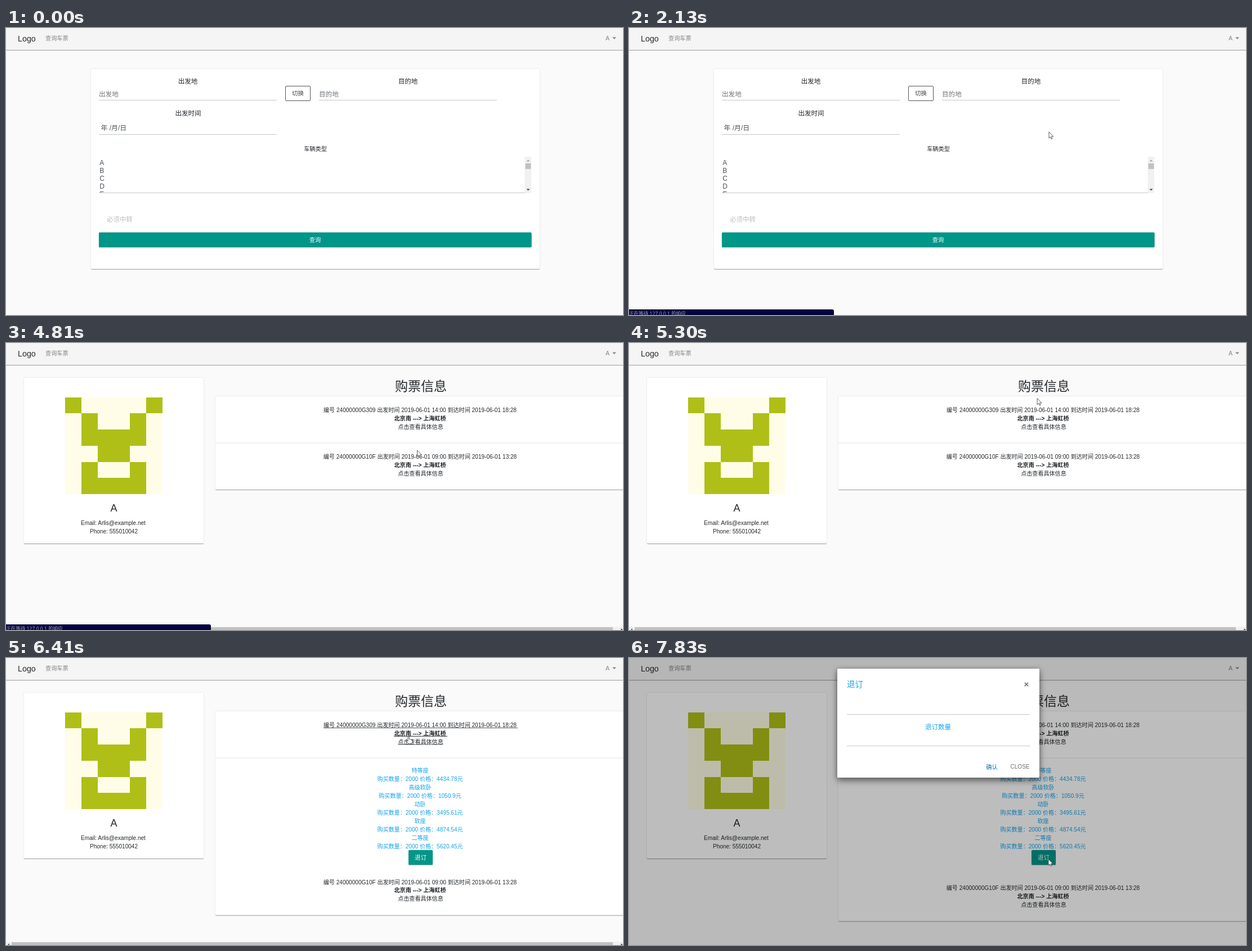
These frames come from a looping animation (1096x511 px, 8 s). An HTML page:

```html
<!DOCTYPE html>
<html lang="zh-CN">
<head>
<meta charset="utf-8">
<title>查询车票</title>
<style>
html, body { margin: 0; width: 100%; height: 100%; overflow: hidden; background: #fafafa; }
svg { display: block; width: 1096px; height: 511px; }
text { font-family: "Liberation Sans", "Noto Sans CJK SC", "Noto Sans CJK", sans-serif; white-space: pre; }
.status text { font-family: "Open Sans", "Noto Sans CJK SC", "Noto Sans CJK", sans-serif; }
.raised { filter: drop-shadow(0 1.3px .7px rgba(0,0,0,.32)) drop-shadow(0 0 1px rgba(0,0,0,.14)); }
.floating { filter: drop-shadow(0 5px 6px rgba(0,0,0,.4)) drop-shadow(0 1px 4px rgba(0,0,0,.25)); }
</style>
</head>
<body>
<svg id="stage" viewBox="0 0 1096 511"></svg>
<script>
const LOOP = 8000;
const INK = '#24282c', MUTED = '#858585', LINE = '#c6c6c6', TEAL = '#009688', BLUE = '#14a3ea';
const BODY = 10.07, FIELD = 11.5;
const USER = 'A';

// Markup helpers; text is placed by its visual centre line.
const text = (x, cy, size, str, fill = INK, attrs = '') =>
  `<text x="${x}" y="${(cy + size * 0.37).toFixed(2)}" font-size="${size}" fill="${fill}" ${attrs}>${str}</text>`;
const mid = (x, cy, size, str, fill = INK, attrs = '') =>
  text(x, cy, size, str, fill, 'text-anchor="middle" ' + attrs);
const rect = (x, y, w, h, fill, attrs = '') =>
  `<rect x="${x}" y="${y}" width="${w}" height="${h}" fill="${fill}" ${attrs}/>`;
const rule = (x, y, w, fill = LINE) => rect(x, y, w, 1, fill);
const path = (d, fill, attrs = '') => `<path d="${d}" fill="${fill}" ${attrs}/>`;
const group = (id, body, attrs = '') => `<g id="${id}" ${attrs}>${body}</g>`;
const RAISED = 'rx="1.5" class="raised"';

function navbar() {
  return rect(-5, -5, 1106, 44, '#f5f5f5', 'class="raised"') +
    text(21, 18.5, 14.3, 'Logo', '#2b2b2b') +
    text(70, 18.5, 10.2, '查询车票', MUTED) +
    group('user', text(1065, 18.5, 10.6, USER, 'inherit') +
      path('M1077 16.5h7l-3.5 3.6z', 'inherit'));
}

function searchForm() {
  const rows = [...'ABCDE'].map((c, i) => text(166.3, 240 + 14 * i, 12, c, '#495057')).join('');
  return rect(151, 73, 797, 356, '#fff', RAISED) +
    mid(323, 95, FIELD, '出发地') + text(165, 117.5, 11.6, '出发地', '#70757a') + rule(165, 128, 316) +
    rect(496.5, 103.5, 44, 26, '#fff', 'rx="1.5" stroke="#555"') + mid(518.5, 116.5, 10.4, '切换', '#444') +
    mid(714, 95, FIELD, '目的地') + text(556, 117.5, 11.6, '目的地', '#70757a') + rule(556, 128, 316) +
    mid(323.5, 152, FIELD, '出发时间') + text(168.5, 177.5, 11.9, '年 /月/日', '#495057') + rule(165, 189, 316) +
    mid(549.5, 215.5, 10.2, '车辆类型') +
    `<g clip-path="url(#listClip)">${rows}</g>` + rule(165, 293, 768) +
    rect(921.5, 229, 11.5, 65, '#f1f1f1') + rect(922.5, 241, 10, 10, '#c1c1c1') +
    path('M924.5 237.5h6l-3-3z', '#a3a3a3') + path('M924.5 286.5h6l-3 3z', '#444') +
    text(179, 341, FIELD, '必须中转', '#bdbdbd') +
    rect(165, 364, 768.5, 26, TEAL, RAISED) + mid(549, 377, 10.3, '查询', '#fff', 'font-weight="500"');
}

function userMenu() {
  return rect(980, 34, 109, 109, '#fff', RAISED) +
    group('menuHover', rect(980, 39.5, 109, 32.5, '#f8f9fa')) +
    ['Profile', 'Settings', 'Logout'].map((s, i) => text(996.3, 56 + 32.6 * i, 11, s, '#3c3c3c')).join('');
}

function avatar() {
  const cell = 28.75;
  const rows = ['100001', '010010', '011110', '001100', '010010', '011110'];
  let d = '';
  rows.forEach((row, r) => [...row].forEach((on, c) => {
    if (+on) d += `M${105 + c * cell} ${96.5 + r * cell}h${cell}v${cell}h${-cell}z`;
  }));
  return rect(105, 96.5, 172.5, 172.5, '#fffde7') + path(d, '#afbf17', 'shape-rendering="crispEdges"');
}

function order(cy, id, start, end) {
  const date = '2019-06-01';
  return mid(735.5, cy, BODY, `编号 ${id} 出发时间 ${date} ${start} 到达时间 ${date} ${end}`) +
    mid(735.5, cy + 14.8, BODY, '北京南 ---&gt; 上海虹桥', '#1b1e21', 'font-weight="bold"') +
    mid(736.5, cy + 29.8, BODY, '点击查看具体信息');
}

function details() {
  const seats = [['特等座', '4434.78'], ['高级软卧', '1050.9'], ['动卧', '3495.61'], ['软座', '4874.54'], ['二等座', '5620.45']];
  return seats.map(([name, price], i) =>
    mid(735.5, 200 + 30 * i, BODY, name, BLUE) +
    mid(735.5, 215 + 30 * i, BODY, `购买数量：2000 价格：${price}元`, BLUE)).join('') +
    rect(715, 342, 43, 26, TEAL, RAISED) + mid(736.5, 355, 10.4, '退订', '#fff', 'font-weight="500"');
}

function profile() {
  return rect(32, 62, 319, 295, '#fff', RAISED) + avatar() +
    mid(191.5, 293.5, 18, USER) +
    mid(190.5, 320.5, BODY, 'Email: Arlis@example.net') +
    mid(191.5, 335.5, BODY, 'Phone: 555010042') +
    mid(737, 76, 23, '购票信息') +
    rect(372, 95, 760, 166, '#fff', 'id="panel" ' + RAISED) + rule(372, 177.5, 724, '#e4e4e4') +
    group('press', rect(552.5, 107, 368.5, 55, '#f5f5f5', 'rx="1.5"')) +
    order(119.3, '24000000G309', '14:00', '18:28') +
    group('underline', rect(564, 124, 345, 0.8, INK) + rect(689, 138.8, 95, 1, INK) + rect(696.5, 153.6, 80, 0.8, INK)) +
    group('details', details(), 'clip-path="url(#detailClip)"') +
    group('second', order(202.2, '24000000G10F', '09:00', '13:28')) +
    group('scrollbar', rect(0, 505, 1096, 6, '#f1f1f1') + rect(10, 506, 1068, 5, '#c1c1c1') +
      path('M6 508v3h-1l-2-.5z', '#505050') + path('M1092.5 508l3 3h-3z', '#303030'));
}

function modal() {
  return rect(370, 19, 359, 194, '#fff', 'rx="1.5" class="floating"') +
    text(387, 47, 14.4, '退订', BLUE) + mid(706, 46, 15, '×', '#6f6f6f', 'font-weight="bold"') +
    rule(387, 100, 325) + mid(549, 123, 11.6, '退订数量', BLUE) + rule(387, 156, 325) +
    mid(644.5, 194, 10.3, '确认', '#0a78a8', 'font-weight="500"') + text(677.5, 193.5, 10.05, 'CLOSE', '#6f6f6f');
}

const OUTLINE = 'stroke="#333" stroke-width=".8" stroke-linejoin="round"';
const stage = document.getElementById('stage');
stage.innerHTML =
  `<defs><clipPath id="listClip"><rect x="165" y="229" width="756" height="65"/></clipPath>
   <clipPath id="detailClip"><rect id="detailBox" x="372" y="179" width="724" height="0"/></clipPath></defs>` +
  rect(0, 0, 1096, 511, '#fafafa') +
  group('form', searchForm()) + group('profile', profile()) + navbar() + group('menu', userMenu()) +
  group('status', path('M0 501h361q3 0 3 3v7H0z', '#05033f') +
    text(0, 508.6, 8.6, '', '#a6a6b2', 'id="statusText"'), 'class="status"') +
  group('backdrop', rect(0, 0, 1096, 511, '#000')) + group('modal', modal()) +
  group('cursor',
    group('arrow', path('M0 0V11.3L2.6 8.9 4.3 12.7 6 12 4.4 8.3H7.8Z', '#fff', OUTLINE)) +
    group('hand', path('M-1.1 1.1Q-1.1 0 0 0T1.1 1.1V5Q3 4.5 3.1 5.6 5 5.1 5 6.3 6.7 6 6.6 7.6V10Q6.4 12 5.5 13.2H-.4Q-1 12-3 9.5-4.5 7.6-3.5 7-2.5 6.6-1.1 8.6Z', '#fff', OUTLINE)));

const el = {};
stage.querySelectorAll('[id]').forEach(n => el[n.id] = n);
const show = (id, on) => el[id].style.display = on ? '' : 'none';
const fade = (id, a) => { show(id, a > 0); el[id].style.opacity = a; };
const ramp = (t, a, b) => Math.min(1, Math.max(0, (t - a) / (b - a)));
const smooth = x => x * x * (3 - 2 * x);

// Pointer stops: time, x, y
const stops = [
  [180, 820, 490], [900, 1070, 18], [1020, 1070, 18], [1220, 1045, 50], [1340, 1044, 53],
  [1630, 1044, 53], [2220, 726.5, 193.5], [2780, 726.5, 193.5], [2910, 729, 193], [3070, 729, 193],
  [3110, 730, 192], [3310, 730, 192], [3470, 730.5, 191], [5110, 730.5, 191], [5370, 724, 79],
  [5600, 715, 139.5], [6480, 715, 139.5], [6660, 715, 145], [6690, 715, 145], [7400, 745, 358]
];

function pointer(t) {
  const i = stops.findIndex(s => s[0] > t);
  if (i < 0) return stops[stops.length - 1].slice(1);
  if (i === 0) return stops[0].slice(1);
  const [t0, x0, y0] = stops[i - 1], [t1, x1, y1] = stops[i];
  const k = smooth(ramp(t, t0, t1));
  return [x0 + (x1 - x0) * k, y0 + (y1 - y0) * k];
}

function draw(t) {
  const [x, y] = pointer(t);
  const inside = (l, top, r, b) => x >= l && x <= r && y >= top && y <= b;
  const onProfile = t >= 4810, modalOpen = t >= 7800;
  show('form', !onProfile);
  show('profile', onProfile);

  // User menu
  const open = smooth(ramp(t, 990, 1110)) * (1 - ramp(t, 1640, 1760));
  const overUser = inside(1058, 8, 1090, 30);
  const overMenu = open > 0.5 && inside(980, 39, 1089, 72);
  fade('menu', open);
  show('menuHover', overMenu);
  el.menu.setAttribute('transform', `translate(${1089 * (1 - open)} ${34 * (1 - open)}) scale(${open})`);
  el.user.setAttribute('fill', overUser || open > 0 ? '#3a3a3a' : MUTED);

  // Link and loading status
  const waiting = t >= 1690 && t < 5140;
  const label = waiting ? '正在等待 127.0.0.1 的响应...'
    : overMenu ? '127.0.0.1:5000/profile'
    : overUser || open > 0 ? '127.0.0.1:5000/#' : '';
  show('status', label !== '');
  if (el.statusText.textContent !== label) el.statusText.textContent = label;

  // Order list
  const overOrder = onProfile && inside(552.5, 107, 921, 162);
  const grow = 207.5 * (1 - Math.pow(1 - ramp(t, 6172, 6502), 2.3));
  show('underline', !modalOpen && (overOrder || t >= 5860));
  fade('press', ramp(t, 5860, 6000) * (1 - ramp(t, 6200, 6400)));
  el.panel.setAttribute('height', 166 + grow);
  el.detailBox.setAttribute('height', grow);
  el.second.setAttribute('transform', `translate(0 ${grow})`);
  show('scrollbar', !modalOpen);

  // Dialog
  const shown = t >= 7830 ? 1 : 0.6;
  fade('backdrop', modalOpen ? 0.26 : 0);
  fade('modal', modalOpen ? shown : 0);
  el.modal.setAttribute('transform', `translate(0 ${-25 * (1 - shown)})`);

  const overButton = t > 6690 && !modalOpen && inside(715, 342, 758, 368);
  const pointing = overUser || overMenu || overOrder || overButton;
  show('cursor', t >= 180);
  show('hand', pointing);
  show('arrow', !pointing);
  el.cursor.setAttribute('transform', `translate(${x} ${y})`);
}

const start = performance.now();
function tick() {
  draw((performance.now() - start) % LOOP);
  requestAnimationFrame(tick);
}
tick();
</script>
</body>
</html>
```
